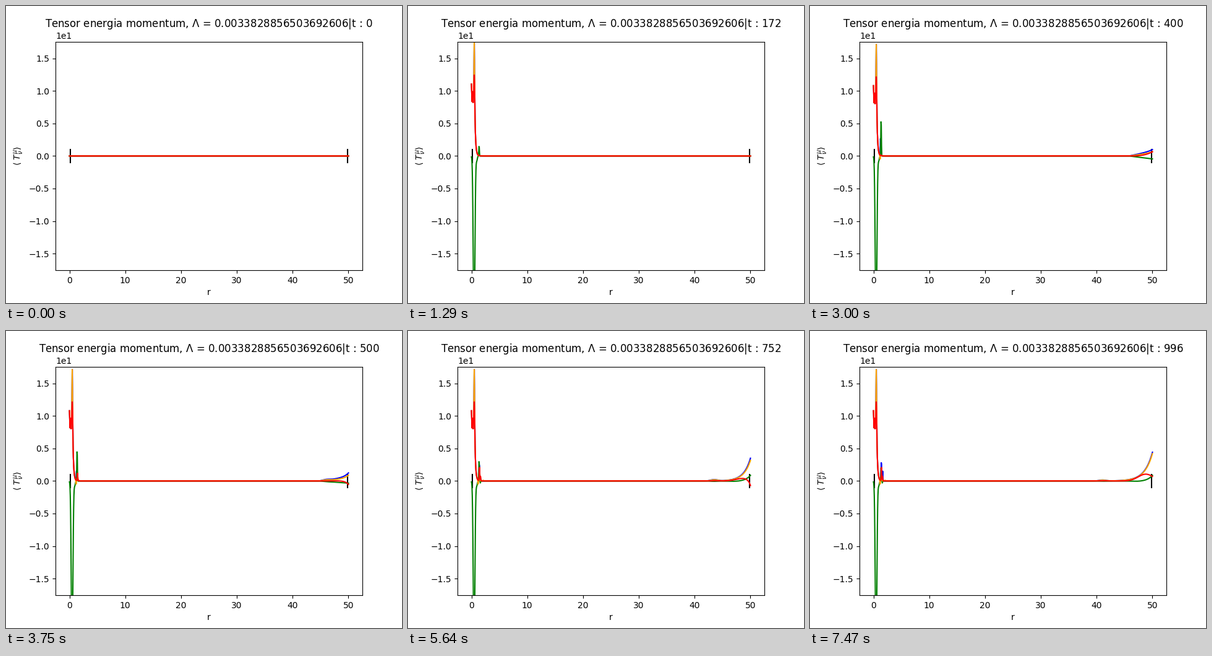
Animation, 640 px wide and 480 px high, one loop 7500 ms. Source, as a matplotlib script:

```python
import numpy as np
import matplotlib.pyplot as plt
from matplotlib.animation import FuncAnimation

FRAMES, INTERVAL, STEP = 250, 30, 4
NAMES = ("blue", "green", "orange", "red")
LAMBDA = "0.0033828856503692606"

r = np.arange(0, 50.01, 0.05)
dist = 50 - r


def rise(t, start, end):
    s = np.clip((t - start) / (end - start), 0, 1)
    return s * s * (3 - 2 * s)


def bell(x, mid, width):
    return np.exp(-((x - mid) / width) ** 2)


def logistic(t, mid, width):
    return 1 / (1 + np.exp((mid - t) / width))


def core_shapes():
    """Profiles near the centre once they have settled."""
    plateau = 8.6 / (1 + (r / .66) ** 7)
    wiggle = .9 * np.cos(10 * np.pi * r) * np.exp(-(r / .36) ** 6)
    red = plateau + wiggle + 1.3 * np.exp(-r / .1) + 4.8 * bell(r, .52, .1)
    orange = red + 5 * bell(r, .5, .07)
    green = -26.5 * bell(r, .47, .205) - .7 * bell(r, .95, .15)
    return {"blue": orange, "green": green, "orange": orange, "red": red}


CORE = core_shapes()


def pulses(t):
    """Narrow spikes just outside the core."""
    decay = np.exp((400 - t) / 620)
    late = rise(t, 380, 600)
    second = rise(t, 420, 750)
    return {
        "blue": 3 * bell(t, 400, 130) * bell(r, 1.27, .05)
        + 3 * rise(t, 400, 850) * bell(r, 1.42, .07)
        + 1.5 * rise(t, 650, 1000) * bell(r, 1.65, .05),
        "green": 5.7 * rise(t, 110, 330) * decay * bell(r, 1.37, .07)
        - .3 * second * bell(r, 1.6, .05),
        "orange": -.6 * rise(t, 170, 330) * bell(r, 1.2, .06)
        + 1.5 * late * bell(r, 1.45, .08)
        + .1 * second * bell(r, 2.1, .2),
        "red": 2.1 * late * bell(r, 1.44, .06)
        + .8 * second * bell(r, 1.62, .06),
    }


def edge(t):
    """Wave that enters at r = 50 and spreads inwards."""
    front = t / 100 + .2
    ramp = np.clip(1 - dist / front, 0, 1)
    start = rise(t, 200, 400)
    first = start * (1 - rise(t, 400, 700))
    surge = start * np.exp(-dist / (.85 + .55 * rise(t, 600, 850)))
    ripple = (rise(t, 400, 600) * (1 - .4 * rise(t, 600, 996))
              * bell(dist, front - 1.2, .85))
    drop = 2 * rise(t, 400, 600) * (1 - rise(t, 600, 900))
    drop_width = .85 - .45 * rise(t, 600, 760)
    swell = rise(t, 600, 740) * (.88 * np.exp(-dist / .9)
                                 - .08 * bell(dist, 2.5, 2))
    hump = 1.05 * rise(t, 600, 950) * bell(dist, 1.2, 1.9)
    return {
        "blue": .75 * first * ramp + .24 * ripple
        + 4.5 * logistic(t, 645, 85) * surge,
        "green": -.45 * first * ramp - .06 * ripple + swell,
        "orange": .47 * first * ramp + .2 * ripple
        + 4.3 * logistic(t, 665, 85) * surge,
        "red": .65 * first * ramp ** 3 + .04 * ripple + hump
        - drop * np.exp(-dist / drop_width),
    }


fig, ax = plt.subplots(figsize=(6.4, 4.8), dpi=100)
for x in (0.15, 49.85):
    ax.plot([x, x], [-1, 1], color="black")
lines = {name: ax.plot(r, 0 * r, color=name, snap=False)[0] for name in NAMES}
ax.set_xlim(-2.5, 52.5)
ax.set_ylim(-17.58, 17.58)
ax.ticklabel_format(axis="y", style="sci", scilimits=(0, 0))
ax.set_xlabel("r")
ax.set_ylabel(r"$\langle\ T^\mu_\nu \rangle$")
title = ax.set_title("")


def update(frame):
    t = frame * STEP
    grow = (1 - np.exp(-(t / 50) ** 2)) * (1 + .05 * np.exp(-(t / 200) ** 2))
    spikes, wave = pulses(t), edge(t)
    for name, line in lines.items():
        line.set_ydata(grow * CORE[name] + spikes[name] + wave[name])
    title.set_text(rf"Tensor energia momentum, $\Lambda$ = {LAMBDA}|t : {t}")
    return [*lines.values(), title]


anim = FuncAnimation(fig, update, frames=FRAMES, interval=INTERVAL,
                     repeat=True, repeat_delay=0)
plt.show()
```
